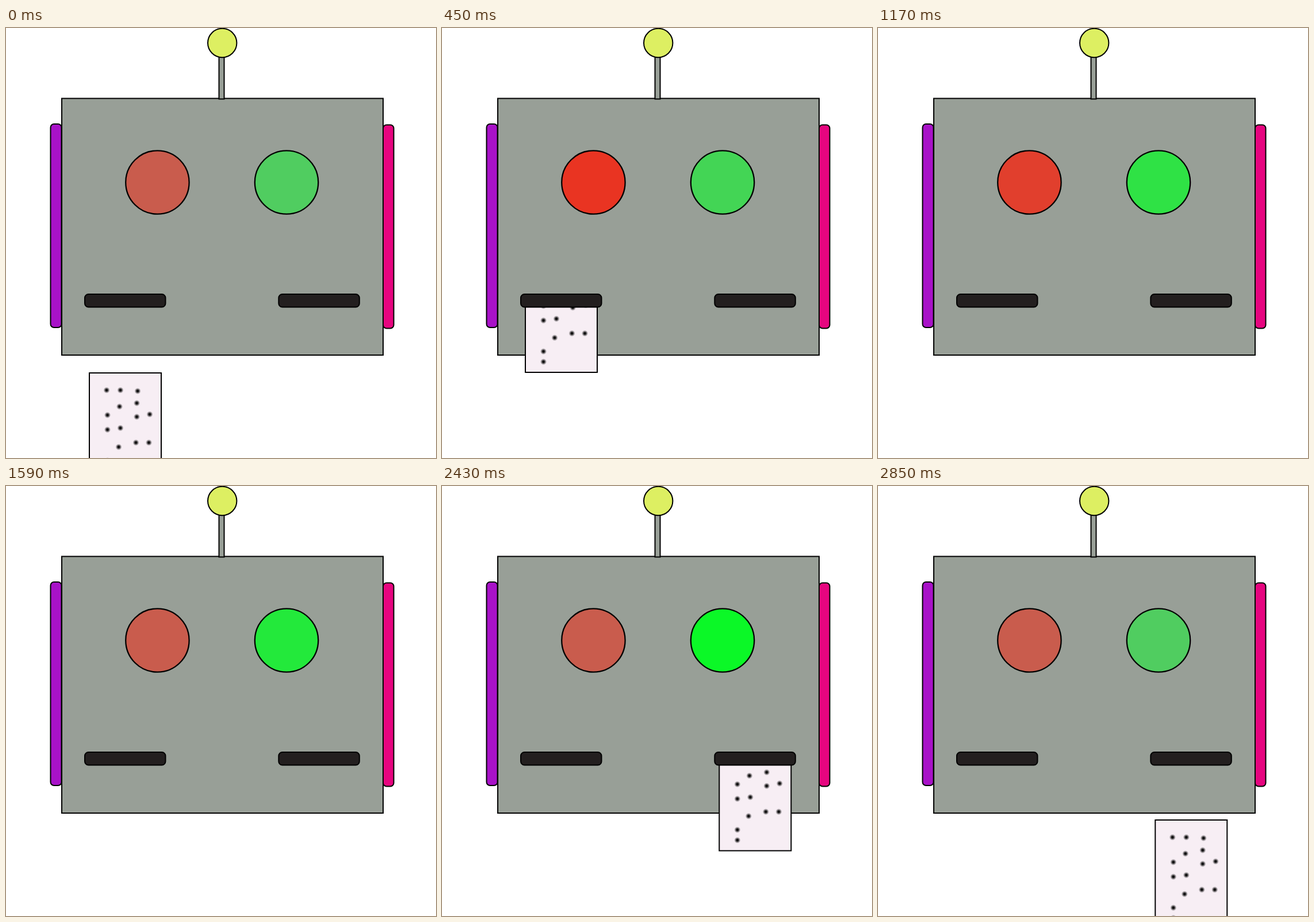
An HTML page for the animation above (2.88 s loop, 748 px wide and 748 px high).

```html
<!DOCTYPE html>
<html lang="en">
<head>
<meta charset="utf-8">
<title>Robot printer</title>
<style>
  html, body { margin: 0; width: 100%; height: 100%; overflow: hidden; background: #fff; }
  svg { display: block; width: 100%; height: 100%; }
</style>
</head>
<body>
<svg viewBox="0 0 748 748">
  <defs>
    <radialGradient id="ink">
      <stop offset="0" stop-color="#000"/>
      <stop offset=".3" stop-color="#000" stop-opacity=".9"/>
      <stop offset=".65" stop-color="#000" stop-opacity=".4"/>
      <stop offset="1" stop-color="#000" stop-opacity="0"/>
    </radialGradient>
    <clipPath id="belowSlots"><rect y="474" width="748" height="274"/></clipPath>
    <g id="card">
      <rect x="145" width="125" height="189" fill="#f7eef4"/>
    </g>
  </defs>
  <g stroke="#000" stroke-width="2">
    <rect x="97" y="122.5" width="559" height="446.5" fill="#989f97"/>
    <rect x="77.5" y="167" width="19" height="354" rx="6" fill="#a812c8"/>
    <rect x="656" y="168.5" width="18.5" height="354" rx="6" fill="#e6057f"/>
    <rect x="370.5" y="50" width="9" height="73.5" fill="#989f97"/>
    <circle cx="376.2" cy="26" r="25.2" fill="#ddef62"/>
    <circle id="redEye" cx="263.4" cy="268.5" r="55.2" stroke-width="2.3"/>
    <circle id="greenEye" cx="488" cy="268.5" r="55.2" stroke-width="2.3"/>
    <g clip-path="url(#belowSlots)">
      <use id="leftCard" href="#card"/>
      <use id="rightCard" href="#card"/>
    </g>
    <g fill="#231f1f">
      <rect x="137" y="463" width="140.5" height="22.5" rx="6.5"/>
      <rect x="474.3" y="463" width="140.5" height="22.5" rx="6.5"/>
    </g>
  </g>
</svg>
<script>
  const LOOP = 2880, STEP = 30;
  const byId = id => document.getElementById(id);
  const [redEye, greenEye, leftCard, rightCard] =
    ['redEye', 'greenEye', 'leftCard', 'rightCard'].map(byId);

  // Ink dots, relative to the card's top edge.
  const dots = [
    [175, 30], [199, 30], [229, 31.5], [227.5, 52.5], [197.5, 58.5],
    [176.5, 73.3], [227.5, 76.3], [250, 72], [176.5, 98.7], [199, 95.8],
    [196, 128.8], [226, 121.2], [248.5, 121.2], [176.5, 152.6], [176.5, 170.6]
  ];
  for (const [x, y] of dots) {
    const dot = document.createElementNS('http://www.w3.org/2000/svg', 'circle');
    const attrs = { cx: x, cy: y, r: 5.6, fill: 'url(#ink)', stroke: 'none' };
    for (const name in attrs) dot.setAttribute(name, attrs[name]);
    byId('card').append(dot);
  }

  const mix = (from, to, k) =>
    `rgb(${from.map((c, i) => Math.round(c + (to[i] - c) * k)).join(',')})`;

  function place(card, x, y, visible) {
    card.setAttribute('transform', `translate(${x} ${y})`);
    card.setAttribute('visibility', visible ? 'visible' : 'hidden');
  }

  function draw(t) {
    const redLevel = Math.max(0, 1 - Math.abs(t - 750) / 750);
    const greenLevel = t <= 2820 ? t / 2820 : 0;
    redEye.setAttribute('fill', mix([201, 92, 77], [255, 25, 5], redLevel));
    greenEye.setAttribute('fill', mix([80, 205, 96], [0, 255, 30], greenLevel));

    // The left card is swallowed, the right one is fed out and drops away.
    place(leftCard, 0, 600 - t * 190 / 450, t < 750);
    place(rightCard, 337.3, 368 + (t - 2190) * 213 / 660, t > 1900);
  }

  const start = performance.now();
  function tick() {
    const t = (performance.now() - start) % LOOP;
    draw(Math.floor(t / STEP) * STEP);
    requestAnimationFrame(tick);
  }
  draw(0);
  requestAnimationFrame(tick);
</script>
</body>
</html>
```
